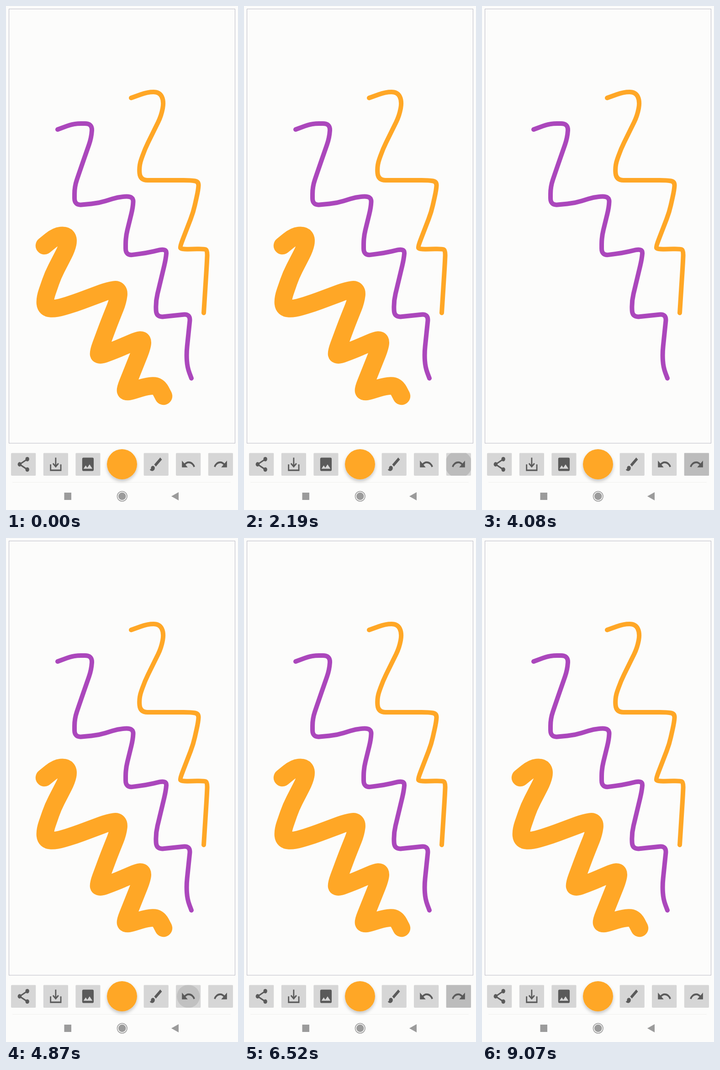
Recreate the animation shown at these times as an HTML page. Size 508x1102 px, loop 9110 ms.

```html
<!DOCTYPE html>
<html lang="en">
<head>
<meta charset="utf-8">
<title>Drawing pad</title>
<style>
  html, body { margin: 0; width: 100%; height: 100%; overflow: hidden; background: #fcfcfb; }
  #stage { display: block; width: 508px; height: 1102px; }
  .line { fill: none; stroke-linecap: round; stroke-linejoin: round; }
  .icon { fill: #5a5a5a; fill-rule: evenodd; }
  .icon .outline { fill: none; stroke: #5a5a5a; stroke-width: 2; }
</style>
</head>
<body>
<svg id="stage" viewBox="0 0 508 1102">
  <defs>
    <filter id="shadow" x="-30%" y="-30%" width="160%" height="170%">
      <feDropShadow dx="0" dy="4" stdDeviation="3.5" flood-color="#000" flood-opacity=".22"/>
    </filter>
  </defs>
  <rect width="508" height="1102" fill="#fcfcfb"/>
  <rect x="6.5" y="6.5" width="495" height="949.5" fill="none" stroke="#babac4"/>
  <g id="strokes"></g>
  <path d="M14 1041.5H492" stroke="#f0f0ee"/>
  <g id="buttons"></g>
  <circle cx="254" cy="1002" r="33" fill="#ffa726" filter="url(#shadow)"/>
  <g fill="#9b9b9b">
    <rect x="127.5" y="1064" width="15.5" height="16"/>
    <circle cx="254.3" cy="1072" r="8.3"/>
    <circle cx="254.3" cy="1072" r="10.8" fill="none" stroke="#9b9b9b" stroke-width="1.5"/>
    <path d="M362 1072L378 1063V1081Z"/>
  </g>
</svg>
<script>
const LOOP = 9110;
const UNDO = 4, REDO = 5;
const ORANGE = '#ffa726', PURPLE = '#ab47bc';
const clamp = v => Math.max(0, Math.min(1, v));

// Turning points of each stroke, in drawing order; undo removes the last.
const strokes = [
  { color: PURPLE, width: 10, turns: `113,270 148,257 189,257 187,288 165,351 150,395 150,436 203,431
    248,417 279,416 278,440 262,505 262,546 307,540 352,530 350,553 328,645 329,681 404,673 395,760 397,790 406,814` },
  { color: ORANGE, width: 10, turns: `274,201 310,188 336,188 346,208 340,240 304,313 291,350 294,381
    405,381 422,384 421,402 410,451 381,526 383,532 434,531 441,534 440,560 433,671` },
  { color: ORANGE, width: 38.5, turns: `84,524 110,503 130,501 137,510 133,530 103,588 85,640 87,661
    110,662 150,650 225,622 248,619 245,645 225,695 202,757 204,765 244,750 288,731 300,730 297,748
    261,838 263,845 310,831 333,830 345,853` }
];

// Joins the turning points with straight runs and rounded corners.
function roundedPath(turns) {
  const pts = turns.trim().split(/\s+/).map(p => p.split(',').map(Number));
  const toward = (a, b) => {
    const len = Math.hypot(b[0] - a[0], b[1] - a[1]);
    const k = Math.min(16, len / 2) / len;
    return [a[0] + (b[0] - a[0]) * k, a[1] + (b[1] - a[1]) * k];
  };
  const corners = pts.slice(1, -1).map((p, i) => `L${toward(p, pts[i])}Q${p} ${toward(p, pts[i + 2])}`);
  return `M${pts[0]}${corners.join('')}L${pts.at(-1)}`;
}

const back = `<path d="M2 7v9h9z"/>
  <path class="outline" style="stroke-width:2.5" d="M6 12.500Q9 9.25 12.5 9.25C16.700 9.25 20 12 21.3 15.400"/>`;
const icons = [
  `<circle cx="18" cy="5" r="3"/><circle cx="6" cy="12" r="3"/><circle cx="18" cy="19" r="3"/>
   <path class="outline" d="M18 5L6 12L18 19"/>`,
  '<path class="outline" d="M4 12v8h16v-8M12 3v12M7.7 10.8l4.3 4.3 4.3-4.3"/>',
  '<path d="M5 3h14q2 0 2 2v14q0 2-2 2H5q-2 0-2-2V5q0-2 2-2zM8.5 13.5l2.5 3 3.5-4.5 4.5 6H5z"/>',
  `<path d="M7 14a3 3 0 0 1 3 3a4 4 0 0 1-4 4q-2.500 0-4-2q2 0 2-2a3 3 0 0 1 3-3z"/>
   <path class="outline" style="stroke-width:3.8" d="M10.4 13.6L19.8 4.2"/>`,
  back,
  `<g transform="matrix(-1 0 0 1 24 0)">${back}</g>`
];

document.getElementById('strokes').innerHTML = strokes.map(s =>
  `<path class="line" stroke="${s.color}" stroke-width="${s.width}" d="${roundedPath(s.turns)}"/>`).join('');

document.getElementById('buttons').innerHTML = icons.map((icon, i) =>
  `<svg x="${11 + 70.6 * i + (i > 2 ? 78.6 : 0)}" y="977.3" width="54.5" height="49.7" overflow="hidden">
    <rect width="54.5" height="49.7" rx="2" fill="#d6d6d6"/>
    <circle class="ripple" cx="27.25" cy="24.85"/>
    <g class="icon" transform="translate(27.25 24.85) scale(1.4 1.62) translate(-12 -12)">${icon}</g>
  </svg>`).join('');

const lines = document.querySelectorAll('.line');
const ripples = document.querySelectorAll('.ripple');

// Three equal rounds: undo twice, then redo twice.
const taps = [];
for (let round = 0; round < 3; round++) {
  const start = 645 + 2082 * round;
  taps.push([start, UNDO], [start + 400, UNDO], [start + 1070, REDO], [start + 1450, REDO]);
}

function draw(t) {
  let shown = strokes.length;
  const pressed = {};
  for (const [start, button] of taps) {
    if (t >= start + 85) shown += button === REDO ? 1 : -1;
    if (t >= start) pressed[button] = t - start;
  }
  lines.forEach((line, i) => line.setAttribute('visibility', i < shown ? 'visible' : 'hidden'));
  ripples.forEach((ripple, button) => {
    const age = pressed[button] ?? LOOP;
    const grow = 1 - (1 - clamp(age / 225)) ** 2;
    ripple.setAttribute('r', 14 + 23.5 * grow);
    ripple.setAttribute('opacity', 0.12 * clamp(age / 75) * (1 - clamp((age - 290) / 170)));
  });
}

const begin = performance.now();
function tick() {
  draw((performance.now() - begin) % LOOP);
  requestAnimationFrame(tick);
}
tick();
</script>
</body>
</html>
```
